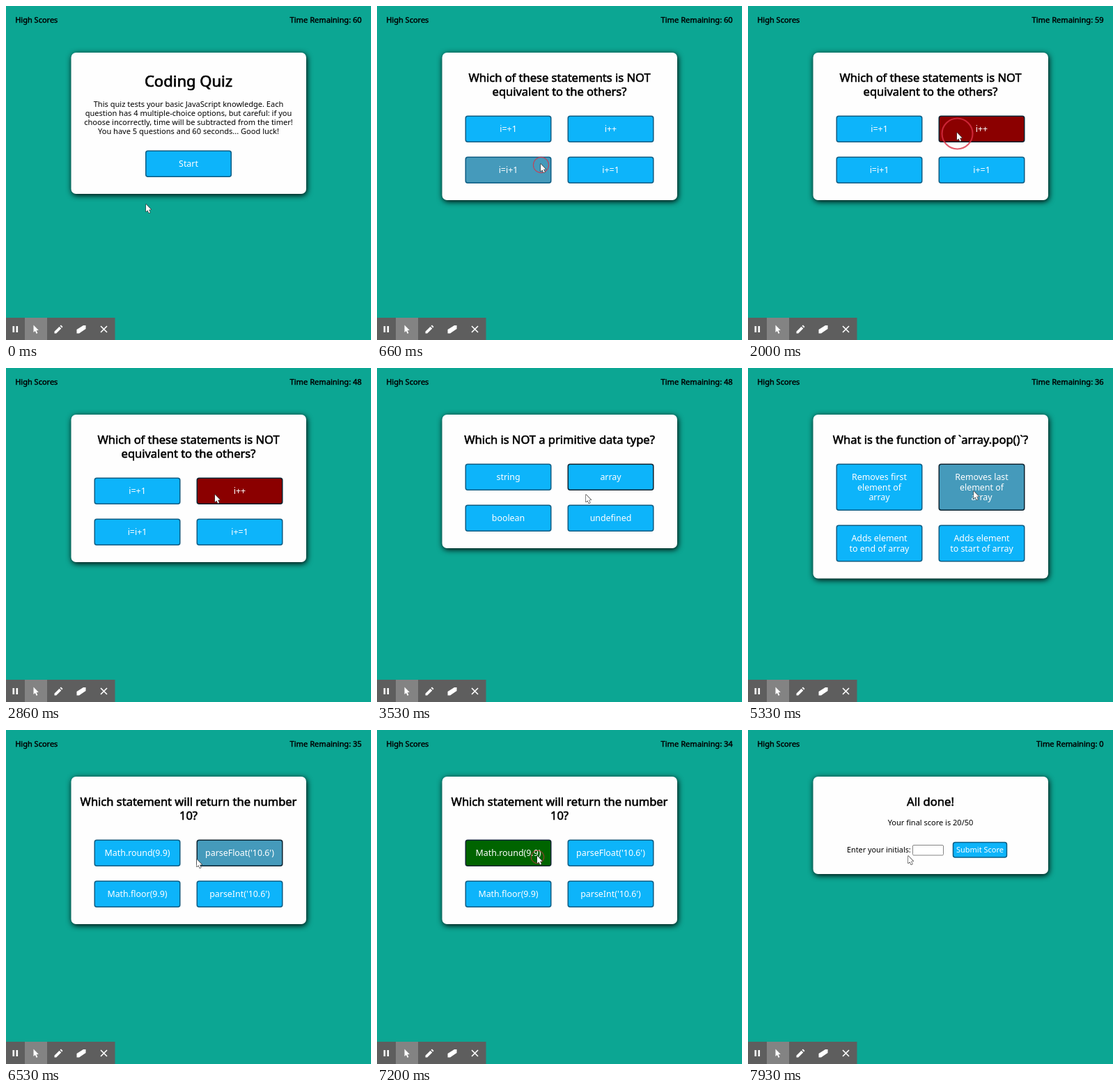
Write an HTML page with a canvas that moves like this. It is 524x480 px and loops after 8000 ms.

```html
<!DOCTYPE html>
<html lang="en">
<head>
<meta charset="utf-8">
<title>Coding Quiz</title>
<style>
  html, body { margin: 0; width: 100%; height: 100%; overflow: hidden; background: #0ca693; }
  canvas { display: block; }
</style>
</head>
<body>
<canvas id="stage" width="524" height="480"></canvas>
<script>
const ctx = document.getElementById('stage').getContext('2d');
const LOOP = 8000;

const INTRO = [
  'This quiz tests your basic JavaScript knowledge. Each',
  'question has 4 multiple-choice options, but careful: if you',
  'choose incorrectly, time will be subtracted from the timer!',
  'You have 5 questions and 60 seconds... Good luck!'
];

// pick: chosen button, picked: when the verdict shows, focus: button chosen before
const QUESTIONS = [
  { start: 600, title: ['Which of these statements is NOT', 'equivalent to the others?'],
    answers: ['i=+1', 'i++', 'i=i+1', 'i+=1'], pick: 1, picked: 1790, verdict: '#8b0000', focus: -1 },
  { start: 3460, title: ['Which is NOT a primitive data type?'],
    answers: ['string', 'array', 'boolean', 'undefined'], pick: 1, picked: 4350, verdict: '#8b0000', focus: 1 },
  { start: 5260, title: ['What is the function of `array.pop()`?'],
    answers: ['Removes first\nelement of\narray', 'Removes last\nelement of\narray',
              'Adds element\nto end of array', 'Adds element\nto start of array'],
    pick: 1, picked: 5750, verdict: '#006400', focus: 1 },
  { start: 6460, title: ['Which statement will return the number', '10?'],
    answers: ['Math.round(9.9)', "parseFloat('10.6')", 'Math.floor(9.9)', "parseInt('10.6')"],
    pick: 0, picked: 7150, verdict: '#006400', focus: 1 }
];
const DONE = 7860;
const CLICKS = [540, 1740, 4300, 5700, 7100];
const TICKS = [[1600, 60], [2600, 59], [3600, 48], [4600, 47], [5600, 36], [6600, 35], [DONE, 34], [LOOP, 0]];
const POINTER = [[0, 201, 285], [100, 201, 285], [480, 235, 227], [800, 235, 227], [1600, 300, 182],
  [3600, 300, 182], [4200, 324, 177], [5800, 324, 177], [6400, 274, 186], [6600, 274, 186], [7000, 230, 181]];

function pointerAt(t) {
  const next = POINTER.findIndex(p => p[0] > t);
  if (next < 0) return POINTER[POINTER.length - 1].slice(1);
  const [t0, x0, y0] = POINTER[next - 1], [t1, x1, y1] = POINTER[next];
  const k = (t - t0) / (t1 - t0), ease = k * k * (3 - 2 * k);
  return [x0 + (x1 - x0) * ease, y0 + (y1 - y0) * ease];
}

function text(str, x, y, size, { align = 'center', color = '#000', bold = 0 } = {}) {
  ctx.font = `${size}px "Noto Sans", sans-serif`;
  ctx.textAlign = align;
  ctx.fillStyle = ctx.strokeStyle = color;
  ctx.fillText(str, x, y);
  if (bold) {
    ctx.lineWidth = bold;
    ctx.strokeText(str, x, y);
  }
}

function box(x, y, w, h, r, fill, border, width = 1.5) {
  ctx.beginPath();
  ctx.roundRect(x, y, w, h, r);
  ctx.fillStyle = fill;
  ctx.fill();
  if (border) {
    ctx.strokeStyle = border;
    ctx.lineWidth = width;
    ctx.stroke();
  }
}

function shape(points, fill, outline) {
  ctx.beginPath();
  points.forEach(([x, y]) => ctx.lineTo(x, y));
  ctx.closePath();
  ctx.lineJoin = 'round';
  if (outline) {
    ctx.strokeStyle = outline;
    ctx.lineWidth = 1.2;
    ctx.stroke();
  }
  ctx.fillStyle = fill;
  ctx.fill();
}

function card(bottom) {
  ctx.save();
  ctx.shadowColor = '#000';
  ctx.shadowBlur = 8;
  ctx.shadowOffsetX = 1;
  ctx.shadowOffsetY = 2;
  box(93.5, 67, 337.5, bottom - 67, 7, '#fefefe');
  ctx.restore();
}

function button(label, x, y, h, fill = '#0db4fa', border = '#0b5b82') {
  box(x + .75, y + .75, 122.5, h - 1.5, 3, fill, border);
  const lines = label.split('\n');
  const first = y + h / 2 + 4.3 - (lines.length - 1) * 7.25;
  lines.forEach((line, i) => text(line, x + 62, first + i * 14.5, 12.4, { color: '#fff' }));
}

function drawIntro() {
  card(270);
  text('Coding Quiz', 262, 116, 22, { bold: .7 });
  INTRO.forEach((line, i) => text(line, 262, 145 + i * 13, 11.05));
  button('Start', 200, 207.5, 38.5);
}

function drawQuestion(q, t, [px, py]) {
  const lineCount = i => q.answers[i].split('\n').length;
  const rowHeight = i => 24 + 14.5 * lineCount(i);
  const top = 117.5 + 20 * q.title.length;
  const second = top + rowHeight(0) + 20.5;
  card(second + rowHeight(2) + 24);
  q.title.forEach((line, i) => text(line, 262, 109 + i * 20, 16.5, { bold: .6 }));
  q.answers.forEach((answer, i) => {
    const x = i % 2 ? 273.5 : 126.5, y = i < 2 ? top : second, h = rowHeight(i);
    const hover = px > x - 6 && px < x + 130 && py > y - 6 && py < y + h + 6;
    const chosen = t >= q.picked;
    const fill = chosen && i === q.pick ? q.verdict : hover ? '#459abb' : undefined;
    const focused = i === (chosen ? q.pick : q.focus);
    button(answer, x, y, h, fill, focused ? '#0a2230' : undefined);
  });
}

function drawDone() {
  card(207);
  text('All done!', 262, 109, 16.6, { bold: .6 });
  text('Your final score is 20/50', 262, 137, 11);
  text('Enter your initials:', 142, 176, 10.8, { align: 'left' });
  box(236.5, 165.5, 44, 14.5, 1.5, '#fff', '#858585', 1);
  box(294.5, 161.5, 77, 21.5, 3, '#0db4fa', '#0b5b82');
  text('Submit Score', 333, 175.7, 11, { color: '#fff' });
}

function arrow(x, y, outline) {
  const points = [[0, 0], [0, 10.5], [2.4, 8.4], [4.2, 12.4], [5.9, 11.6], [4.1, 7.7], [7.3, 7.5]];
  shape(points.map(([dx, dy]) => [x + dx, y + dy]), '#fff', outline);
}

function drawToolbar() {
  ctx.fillStyle = '#5e5e5e';
  ctx.fillRect(0, 448, 156.5, 32);
  ctx.fillStyle = '#838383';
  ctx.fillRect(27, 448, 32, 32);
  ctx.fillStyle = '#fff';
  ctx.fillRect(9.5, 460, 2.6, 9);
  ctx.fillRect(14.5, 460, 2.6, 9);
  arrow(39.5, 458.5);
  shape([[69.5, 470.5], [69.5, 467.8], [76.6, 460.7], [79.3, 463.4], [72.2, 470.5]], '#fff');
  shape([[77.5, 459.8], [79, 458.5], [81.5, 461], [80.2, 462.5]], '#fff');
  shape([[101.5, 465], [111, 459], [114.5, 459], [114.5, 464], [105, 470.5], [101.5, 470.5]], '#fff');
  ctx.strokeStyle = '#fff';
  ctx.lineWidth = 1.6;
  ctx.beginPath();
  ctx.moveTo(136, 460);
  ctx.lineTo(145, 469);
  ctx.moveTo(145, 460);
  ctx.lineTo(136, 469);
  ctx.stroke();
}

function drawClick(t, [x, y]) {
  const click = CLICKS.find(c => t >= c && t < c + 360);
  if (click === undefined) return;
  const age = t - click, r = 22 * Math.min(1, age / 240);
  ctx.globalAlpha = Math.min(1, (360 - age) / 100) * .8;
  ctx.strokeStyle = '#dc2f45';
  ctx.lineWidth = Math.max(1, r / 10);
  ctx.beginPath();
  ctx.arc(x + .5, y + 1.5, r, 0, Math.PI * 2);
  ctx.stroke();
  ctx.globalAlpha = 1;
}

function draw(now) {
  const t = now % LOOP, pointer = pointerAt(t);
  ctx.fillStyle = '#0ca693';
  ctx.fillRect(0, 0, 524, 480);
  text('High Scores', 13.2, 23.7, 11, { align: 'left', bold: .45 });
  const remaining = TICKS.find(([until]) => t < until)[1];
  text('Time Remaining: ' + remaining, 510.7, 23.7, 11.1, { align: 'right', bold: .45 });

  const question = QUESTIONS.filter(q => t >= q.start).pop();
  if (t >= DONE) drawDone();
  else if (question) drawQuestion(question, t, pointer);
  else drawIntro();

  drawToolbar();
  drawClick(t, pointer);
  arrow(...pointer, '#333');
  requestAnimationFrame(() => draw(performance.now()));
}
draw(performance.now());
</script>
</body>
</html>
```
